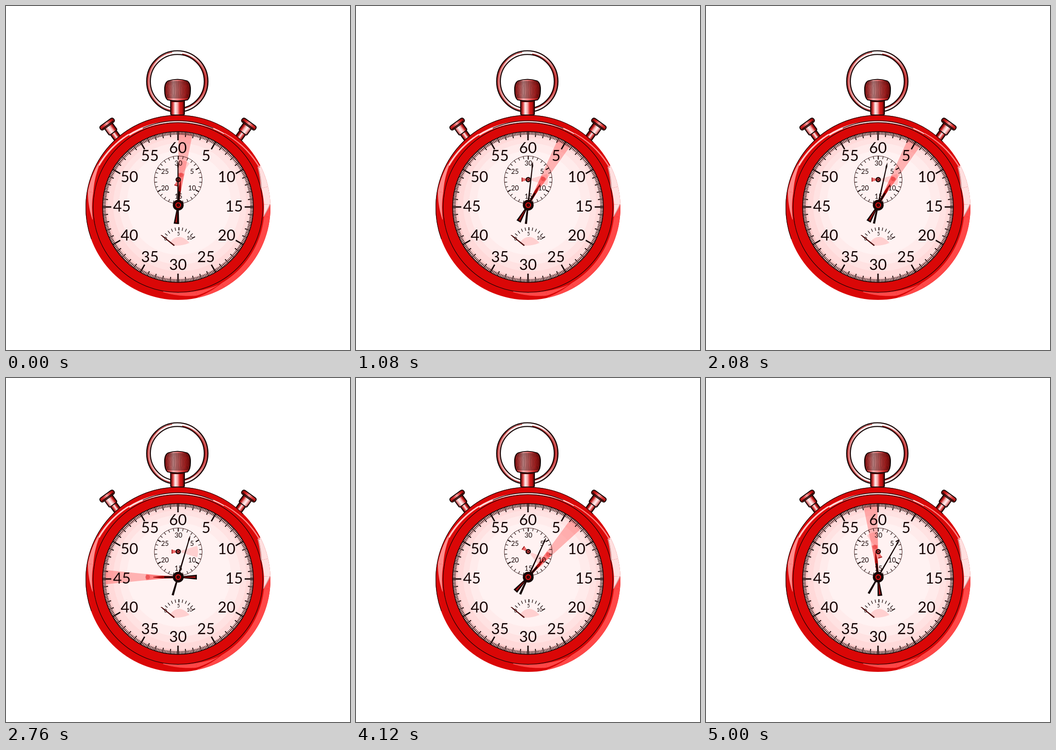
Recreate the animation shown at these times as an HTML page with a canvas. Size 748 px wide and 748 px high, loop 5.04 s.

```html
<!DOCTYPE html>
<html lang="en">
<head>
<meta charset="utf-8">
<title>Stopwatch</title>
<style>
html, body { margin: 0; width: 100%; height: 100%; overflow: hidden; background: #fff; }
canvas { display: block; }
</style>
</head>
<body>
<canvas id="stage" width="748" height="748"></canvas>
<script>
const stage = document.getElementById('stage').getContext('2d');
const face = document.createElement('canvas');
face.width = face.height = 748;
let g = face.getContext('2d');

const INK = '#160606', RED = '#da0707', BRIGHT = '#ff4747', PALE = '#ffe0e0';
const rad = deg => deg * Math.PI / 180;
// Clock angles: zero points up, clockwise.
const polar = (x, y, r, deg) => [x + r * Math.sin(rad(deg)), y - r * Math.cos(rad(deg))];

function disc(x, y, r, fill) {
  g.beginPath();
  g.arc(x, y, r, 0, 7);
  g.fillStyle = fill;
  g.fill();
}
function ring(x, y, r, color, width, from = 0, to = 360) {
  g.beginPath();
  g.arc(x, y, r, rad(from - 90), rad(to - 90));
  g.strokeStyle = color;
  g.lineWidth = width;
  g.stroke();
}
function poly(points, fill) {
  g.beginPath();
  points.forEach(p => g.lineTo(...p));
  g.closePath();
  g.fillStyle = fill;
  g.fill();
}
function box(x, y, w, h, r, fill) {
  g.beginPath();
  g.roundRect(x, y, w, h, r);
  g.fillStyle = fill;
  g.fill();
  g.strokeStyle = INK;
  g.lineWidth = 2;
  g.stroke();
}
function tick(x, y, deg, r0, r1, width) {
  g.beginPath();
  g.moveTo(...polar(x, y, r0, deg));
  g.lineTo(...polar(x, y, r1, deg));
  g.strokeStyle = INK;
  g.lineWidth = width;
  g.stroke();
}
function label(text, x, y, size) {
  g.font = `${size}px Lato, sans-serif`;
  g.textAlign = 'center';
  g.textBaseline = 'alphabetic';
  g.fillStyle = INK;
  g.fillText(text, x, y + size * 0.36);
}
// Part of the case rim whose inner and outer radii change along its length.
function band(a0, a1, [in0, out0], [in1, out1], fill) {
  const outer = [], inner = [];
  for (let i = 0; i <= 40; i++) {
    const k = i / 40, a = a0 + (a1 - a0) * k;
    outer.push(polar(374, 438, out0 + (out1 - out0) * k, a));
    inner.unshift(polar(374, 438, in0 + (in1 - in0) * k, a));
  }
  poly(outer.concat(inner), fill);
}
// Horizontal gradient with evenly spaced colours.
function across(x0, x1, ...colors) {
  const fill = g.createLinearGradient(x0, 0, x1, 0);
  colors.forEach((c, i) => fill.addColorStop(i / (colors.length - 1), c));
  return fill;
}

function drawCrown() {
  ring(372.5, 164, 62.5, across(304, 441, '#d86060', '#fff0f0', '#fff', '#ffe4e4', '#c02828'), 8);
  ring(372.5, 164, 60.5, '#a81616', 1.8, 10, 170);
  ring(372.5, 164, 64.5, '#b42222', 1.6, 190, 350);
  ring(372.5, 164, 66.6, INK, 2.4);
  ring(372.5, 164, 58.6, INK, 2.2);

  box(358, 200, 30, 37, 3, across(358, 388, '#4a0404', '#e04040', '#fff0f0', '#f7b0b0', '#d81a1a', '#c01010', '#2a0202'));
  poly([[358, 204], [388, 204], [387, 209], [359, 209]], '#5a0606');
  g.beginPath();
  g.moveTo(352, 163);
  g.quadraticCurveTo(373, 156, 394, 163);
  g.quadraticCurveTo(402, 168, 401, 184);
  g.quadraticCurveTo(401, 199, 395, 204);
  g.quadraticCurveTo(373, 209, 351, 204);
  g.quadraticCurveTo(345, 199, 345, 184);
  g.quadraticCurveTo(344, 168, 352, 163);
  g.fillStyle = across(345, 401, '#b01010', '#e85050', '#f7b0b0', '#f08080', '#e04848', '#d02020', '#8a0808');
  g.fill();
  g.strokeStyle = INK;
  g.lineWidth = 2;
  g.stroke();
  for (let i = 0; i < 17; i++) {
    const u = i / 8 - 1;
    g.beginPath();
    g.moveTo(373 + 21 * u, 163);
    g.quadraticCurveTo(373 + 31 * u, 182, 373 + 23 * u, 201);
    g.lineWidth = 1.1;
    g.stroke();
  }
}

function drawButton(side) {
  g.save();
  g.translate(374 + 153.5 * side, 257.5);
  g.scale(-side, 1);
  g.rotate(rad(-36));
  box(-8, 20, 16, 18, 1, across(-8, 8, '#3a0303', '#e04040', '#fff0f0', '#b81212', '#300'));
  box(-10.5, 2, 21, 20, 3, across(-11, 11, '#5a0505', '#f4a0a0', '#fff2f2', '#f7b0b0', '#c01818', '#300'));
  box(-18, -6, 36, 10, 4, across(-18, 18, '#a00c0c', '#d83030', '#f7a0a0', '#d62222', '#700'));
  g.beginPath();
  g.moveTo(-15, 1.5);
  g.lineTo(15, 1.5);
  g.stroke();
  g.restore();
}

function drawCase() {
  disc(374, 438, 201, RED);
  band(63, 77, [196, 201], [186, 201], PALE);
  band(63, 77, [194, 196], [184, 187], '#d79a9a');
  band(77, 88, [186, 201], [187, 201], PALE);
  band(88, 96, [187, 201], [187, 187], PALE);
  band(88, 96, [201, 201], [188, 201], BRIGHT);
  band(88, 96, [199, 201], [186, 188], '#dba0a0');
  band(96, 150, [188, 201], [190, 201], BRIGHT);
  band(150, 168, [190, 201], [200, 201], BRIGHT);
  band(152, 168, [190, 190], [186, 196], BRIGHT);
  band(168, 190, [186, 196], [184, 187], BRIGHT);
  band(262, 280, [187, 188], [187, 199], '#ff8c8c');
  band(280, 298, [187, 199], [194, 198], '#ff8c8c');
  band(298, 326, [193, 197], [190, 193], '#ffc4c4');
  band(326, 360, [188, 192], [184, 188], '#ffd6d6');
  band(360, 392, [184, 188], [188, 190], '#ffd6d6');
  band(392, 424, [189, 191], [196, 199], '#ff8080');
  ring(374, 438, 184.5, INK, 1.3);
  ring(374, 438, 188.5, INK, 1.3, -24, 24);
  ring(374, 438, 200.5, INK, 1.2, 250, 405);
  disc(374, 438, 183.8, RED);
}

function drawDial() {
  disc(374, 437, 164, '#ffcaca');
  disc(377, 435, 156, '#ffd9d9');
  disc(378, 432, 145, '#ffe2e2');
  disc(378, 430, 132, '#ffebeb');
  disc(376, 428, 113, '#fff2f2');
  ring(374, 437, 164, INK, 1.6);
  for (let i = 0; i < 300; i++) {
    const hour = i % 25 == 0, minute = i % 5 == 0;
    tick(374, 437, i * 1.2, hour ? 145 : minute ? 153 : 157, 164, hour ? 3 : minute ? 2 : 1.4);
  }
  for (let i = 1; i <= 12; i++) {
    const a = rad(i * 30);
    label(i * 5, 374 + 122 * Math.sin(a), 435 - 127 * Math.cos(a), 33);
  }

  ring(374.5, 378, 52, '#402020', 1);
  for (let i = 0; i < 30; i++) {
    const major = i % 5 == 0;
    tick(374.5, 378, i * 12, major ? 44 : 46, 52, major ? 2.2 : 1.2);
  }
  for (let i = 1; i <= 6; i++) {
    const a = rad(i * 60);
    label(i * 5, 375 + 34 * Math.sin(a), 378 - 36 * Math.cos(a), 14.5);
  }

  g.beginPath();
  g.moveTo(366, 521);
  g.lineTo(357, 513);
  g.quadraticCurveTo(377, 490, 399, 515);
  g.quadraticCurveTo(383, 522, 366, 521);
  g.fillStyle = '#ffd0d0';
  g.fill();
  for (let i = 0; i <= 10; i++) {
    tick(376, 521, (i - 5) * 12.2, 33, 40, i % 5 ? 1.3 : 2);
  }
  label(0, 347, 506, 10.5);
  label(5, 375, 495, 10.5);
  label(10, 399, 504, 10.5);
  poly([[336, 498], [339, 498], [367, 520], [365, 522]], '#4a0808');
}

drawCrown();
drawButton(-1);
drawButton(1);
drawCase();
drawDial();

// Draws with the pivot at the origin and the hand pointing up.
function hand(x, y, deg, draw) {
  g.save();
  g.translate(x, y);
  g.rotate(rad(deg));
  draw();
  g.restore();
}
function wedge(r0, r1, halfAngle, fill) {
  g.beginPath();
  g.arc(0, 0, r1, rad(-90 - halfAngle), rad(-90 + halfAngle));
  g.arc(0, 0, r0, rad(-90 + halfAngle), rad(-90 - halfAngle), true);
  g.closePath();
  g.fillStyle = fill;
  g.fill();
}

function smallHand() {
  g.globalCompositeOperation = 'multiply';
  wedge(7, 43, 17, '#ffdcdc');
  g.globalCompositeOperation = 'source-over';
  poly([[-2, 5], [2, 5], [4.5, 14], [-4.5, 14]], '#ef6b6b');
  poly([[-4.5, 12.5], [4.5, 12.5], [4.5, 14.5], [-4.5, 14.5]], '#a52020');
}
function sweepHand() {
  g.globalCompositeOperation = 'multiply';
  wedge(70, 158, 5.6, '#ffbcbc');
  wedge(26, 70, 5.6, '#ff8484');
  disc(0, -66, 5, '#eeb4b4');
  poly([[-2.5, -10], [2.5, -10], [3, -34], [0.5, -54], [-0.5, -54], [-3, -34]], '#a01414');
  g.globalCompositeOperation = 'source-over';
  poly([[-2, -8], [2, -8], [1.6, -30], [-1.6, -30]], INK);
  poly([[-2, 8], [2, 8], [5.2, 41], [-5.2, 41]], INK);
  poly([[-0.4, 14], [0.4, 14], [1.6, 38], [-1.6, 38]], '#b51515');
}
function slowHand() {
  poly([[0, -95], [1.8, -86], [1.1, -80], [1.6, 0], [2.4, 41], [-2.4, 41], [-1.6, 0], [-1.1, -80], [-1.8, -86]], INK);
}

// The hands advance 30 times a second and are shown every 40 ms.
function render(now) {
  const time = Math.floor(now % 5040 / 40) * 40;
  const step = Math.min(Math.floor(time * 30 / 1000), 149);
  g = stage;
  g.fillStyle = '#fff';
  g.fillRect(0, 0, 748, 748);
  g.drawImage(face, 0, 0);

  hand(374.5, 377.5, 18 + step * 36, smallHand);
  disc(374.5, 377.5, 5.8, INK);
  disc(374.5, 377.5, 3.2, '#c94040');
  disc(374.5, 377.5, 1.3, INK);
  hand(374, 433, 6 + step * 12, sweepHand);
  hand(374, 433, step * 0.2, slowHand);
  disc(374.5, 433, 11.8, INK);
  ring(374.5, 433, 5, '#d01010', 2.6);
  disc(374.5, 433, 1.8, '#5a0606');
}

const start = performance.now();
function loop() {
  render(performance.now() - start);
  requestAnimationFrame(loop);
}
loop();
</script>
</body>
</html>
```
